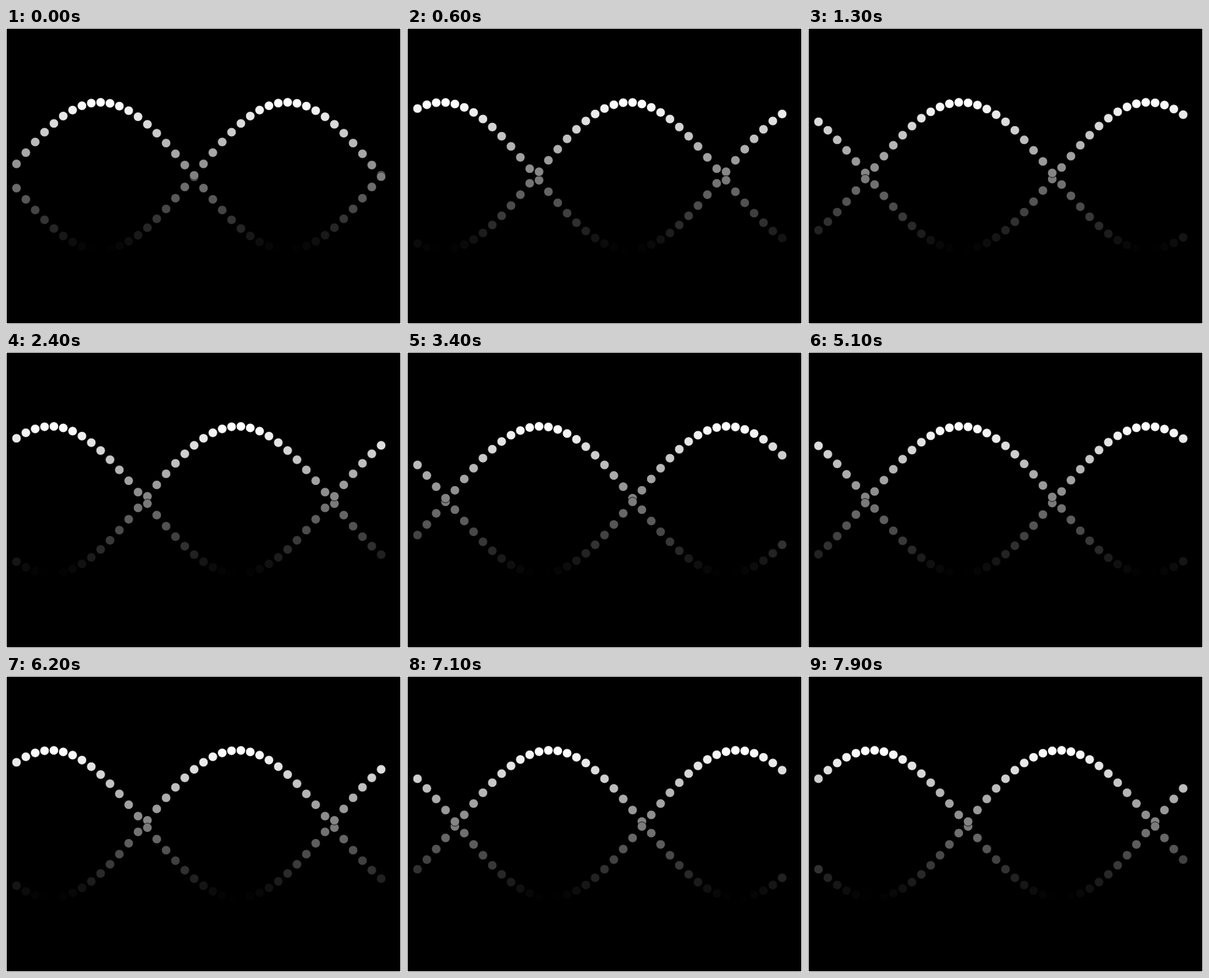
An HTML page with a canvas for the animation above (8000 ms loop, 602 by 452 pixels).

```html
<!DOCTYPE html>
<html lang="en">
<head>
<meta charset="utf-8">
<title>Double helix</title>
<style>
  html, body { margin: 0; width: 100%; height: 100%; overflow: hidden; background: #fff; }
  canvas { display: block; }
</style>
</head>
<body>
<canvas id="stage" width="602" height="452"></canvas>
<script>
const ctx = document.getElementById('stage').getContext('2d');
const DOTS = 40, STEP_MS = 100, STEPS = 80;
const LEFT = 16, GAP = 14.25, MID = 226, AMP = 112.5, RADIUS = 7;

function dot(x, level) {
  const gray = Math.round(127.5 * (1 + level));
  ctx.beginPath();
  ctx.arc(x, MID - AMP * level, RADIUS, 0, 2 * Math.PI);
  ctx.fillStyle = `rgb(${gray}, ${gray}, ${gray})`;
  ctx.fill();
  ctx.stroke();
}

function strand(phase, sign) {
  for (let i = 0; i < DOTS; i++) {
    dot(LEFT + GAP * i, sign * Math.sin(phase + i * Math.PI / 20));
  }
}

function draw(ms) {
  const step = Math.floor(ms / STEP_MS) % STEPS;
  const phase = (step + 1) * Math.PI / 19;
  ctx.fillStyle = '#fff';
  ctx.fillRect(0, 0, 602, 452);
  ctx.fillStyle = '#000';
  ctx.fillRect(1, 1, 600, 450);
  ctx.strokeStyle = '#000';
  ctx.lineWidth = 0.8;
  strand(phase, 1);
  strand(phase, -1);
}

const start = performance.now();
function tick() {
  draw(performance.now() - start);
  requestAnimationFrame(tick);
}
tick();
</script>
</body>
</html>
```
